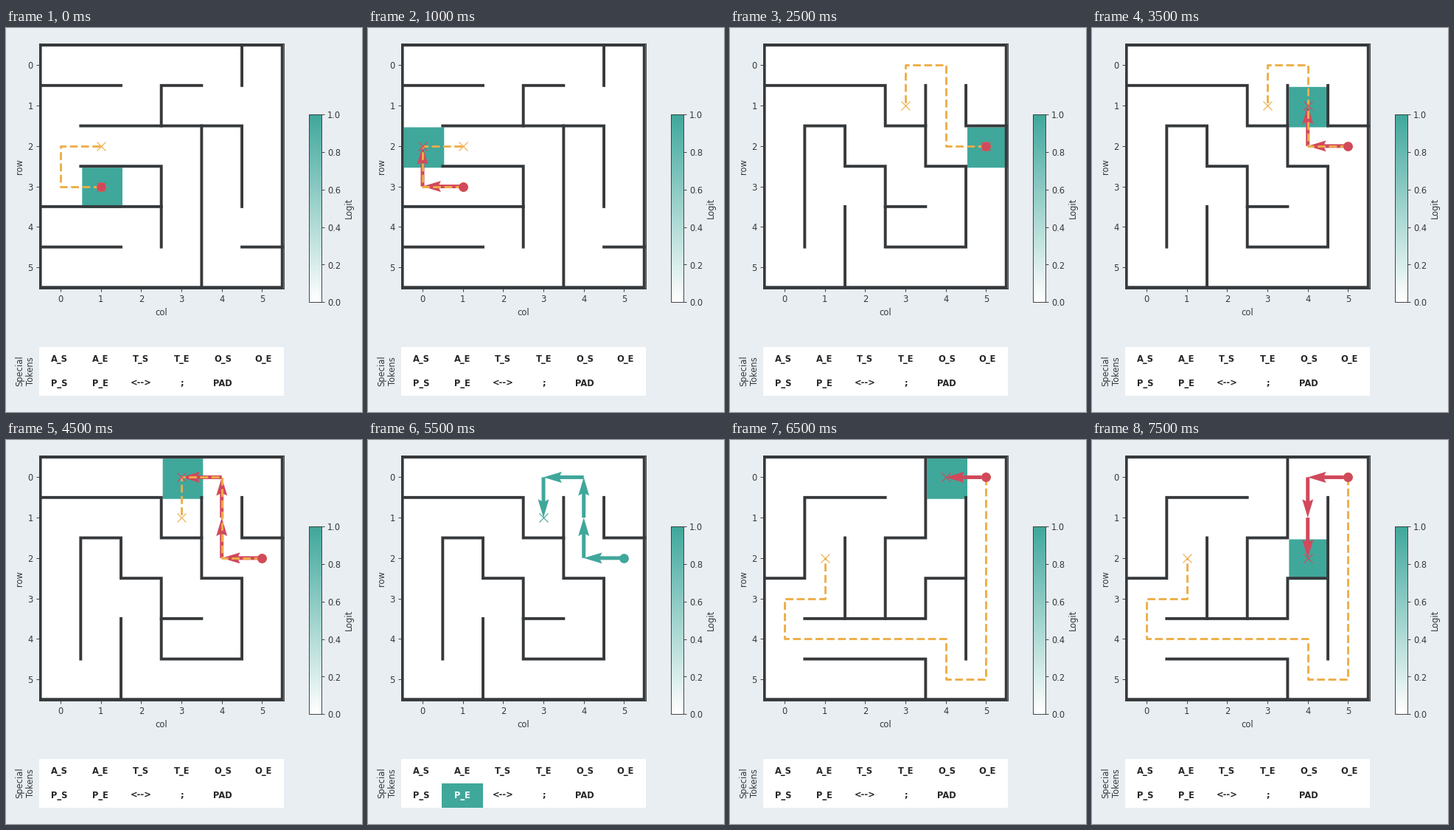
A matplotlib script that plays this animation: 483x520 px, repeating every 8000 ms.

```python
import numpy as np
import matplotlib.pyplot as plt
from matplotlib.animation import FuncAnimation
from matplotlib.cm import ScalarMappable
from matplotlib.colors import LinearSegmentedColormap
from matplotlib.patches import Rectangle

W, H, DPI = 483, 520, 83
BG, INK, DARK = "#E8EEF2", "#36393B", "#262626"
TEAL, RED, ORANGE = "#40A79B", "#D1495B", "#EDAE49"
N, SIDE = 6, 332            # cells per side, maze size in pixels
HALF_WALL = 1 / 28          # in cells
WALL_PT = SIDE / (14 * N + 1) * 72 / DPI

STEPS = {"L": (-1, 0), "R": (1, 0), "U": (0, -1), "D": (0, 1)}
BORDER = "00" + "R" * N + "D" * N + "L" * N + "U" * N

# Walls, true path, predicted path; each stroke is a start "xy" plus steps.
MAZES = [
    ("01RR 41LD 50D 12RRRRDD 42DDDD 13RRDD 04RRR 05RR 55R",
     "13LUR", "13LUR"),
    ("01RRRDRU 42DRDDLLUULULDDD 24DD 34R 51DR",
     "52LUULD", "52LUULD"),
    ("40DDLDD 22DD 31LLDDL 14RRRUR 51DDDD 15RRRD",
     "50DDDDDLULLLLURU", "50LDD"),
]

plt.rcParams.update({
    "font.family": "DejaVu Sans", "font.size": 10,
    "axes.edgecolor": INK, "axes.labelcolor": INK, "text.color": INK,
    "xtick.color": INK, "ytick.color": INK,
})


def walk(stroke):
    start = [int(d) for d in stroke[:2]]
    return np.cumsum([start] + [STEPS[s] for s in stroke[2:]], axis=0).T


def build_frames():
    """List (maze, cells visited, path finished, end token shown)."""
    frames = []
    for m, (_, true, pred) in enumerate(MAZES):
        cells, solved = len(pred) - 1, pred == true
        frames += [(m, n, solved and n == cells, False)
                   for n in range(1, cells + 1)]
        if solved:
            frames.append((m, cells, True, True))
    return frames


def px_axes(x0, y0, x1, y1):
    return fig.add_axes([x0 / W, 1 - y1 / H, (x1 - x0) / W, (y1 - y0) / H])


fig = plt.figure(figsize=(W / DPI, H / DPI), dpi=DPI, facecolor=BG)
FRAMES = build_frames()

# maze
ax = px_axes(44.7, 21.2, 44.7 + SIDE, 21.2 + SIDE)
lo, hi = -0.5 - HALF_WALL, N - 0.5 + HALF_WALL
ax.set(xlim=(lo, hi), ylim=(hi, lo), xticks=range(N), yticks=range(N),
       xlabel="col", ylabel="row")

# colour scale
cmap = LinearSegmentedColormap.from_list("logit", ["white", TEAL])
fig.colorbar(ScalarMappable(cmap=cmap), cax=px_axes(411.2, 117.3, 428, 371.3),
             label="Logit")

# special tokens
table = px_axes(45, 431.6, 377, 497.6)
table.set(xlim=(0, 6), ylim=(2, 0), xticks=[], yticks=[],
          ylabel="Special\nTokens")
for spine in table.spines.values():
    spine.set_visible(False)
mark = table.add_patch(Rectangle((1, 1), 1, 1, fc=TEAL, lw=0))
tokens = {}
for r, row in enumerate(["A_S A_E T_S T_E O_S O_E", "P_S P_E <--> ; PAD"]):
    for c, name in enumerate(row.split()):
        tokens[name] = table.text(c + 0.5, r + 0.5, name, ha="center",
                                  va="center", weight="bold", color=DARK)

drawn = []


def draw_walls(strokes):
    for stroke in [BORDER] + strokes.split():
        x, y = walk(stroke) - 0.5
        drawn.extend(ax.plot(x, y, color=INK, lw=WALL_PT, zorder=0.8,
                             solid_capstyle="projecting",
                             solid_joinstyle="miter", snap=False))


def draw_ends(x, y, color):
    drawn.extend(ax.plot(x[:1], y[:1], "o", color=color, ms=10))
    drawn.extend(ax.plot(x[-1:], y[-1:], "x", color=color, ms=10))


def update(i):
    m, n, done, path_end = FRAMES[i]
    walls, true, pred = MAZES[m]
    while drawn:
        drawn.pop().remove()
    draw_walls(walls)

    if not done:
        x, y = walk(true)
        drawn.extend(ax.plot(x, y, "--", color=ORANGE, lw=2.5))
        draw_ends(x, y, ORANGE)

    color = TEAL if done else RED
    x, y = walk(pred)[:, :n]
    if not path_end:
        # a cell owns the openings to its right and below
        corner = (x[-1] - 0.5 + HALF_WALL, y[-1] - 0.5 + HALF_WALL)
        drawn.append(ax.add_patch(Rectangle(corner, 1, 1, fc=TEAL, lw=0,
                                            zorder=0.5, snap=False)))
    if n > 1:
        drawn.append(ax.quiver(x[:-1], y[:-1], np.diff(x), np.diff(y),
                               angles="xy", scale_units="xy", scale=1,
                               width=0.015, color=color))
    draw_ends(x, y, color)

    mark.set_visible(path_end)
    tokens["P_E"].set_color("white" if path_end else DARK)
    return drawn


anim = FuncAnimation(fig, update, frames=len(FRAMES), interval=500,
                     init_func=lambda: update(0), repeat=True, repeat_delay=0)
plt.show()
```
